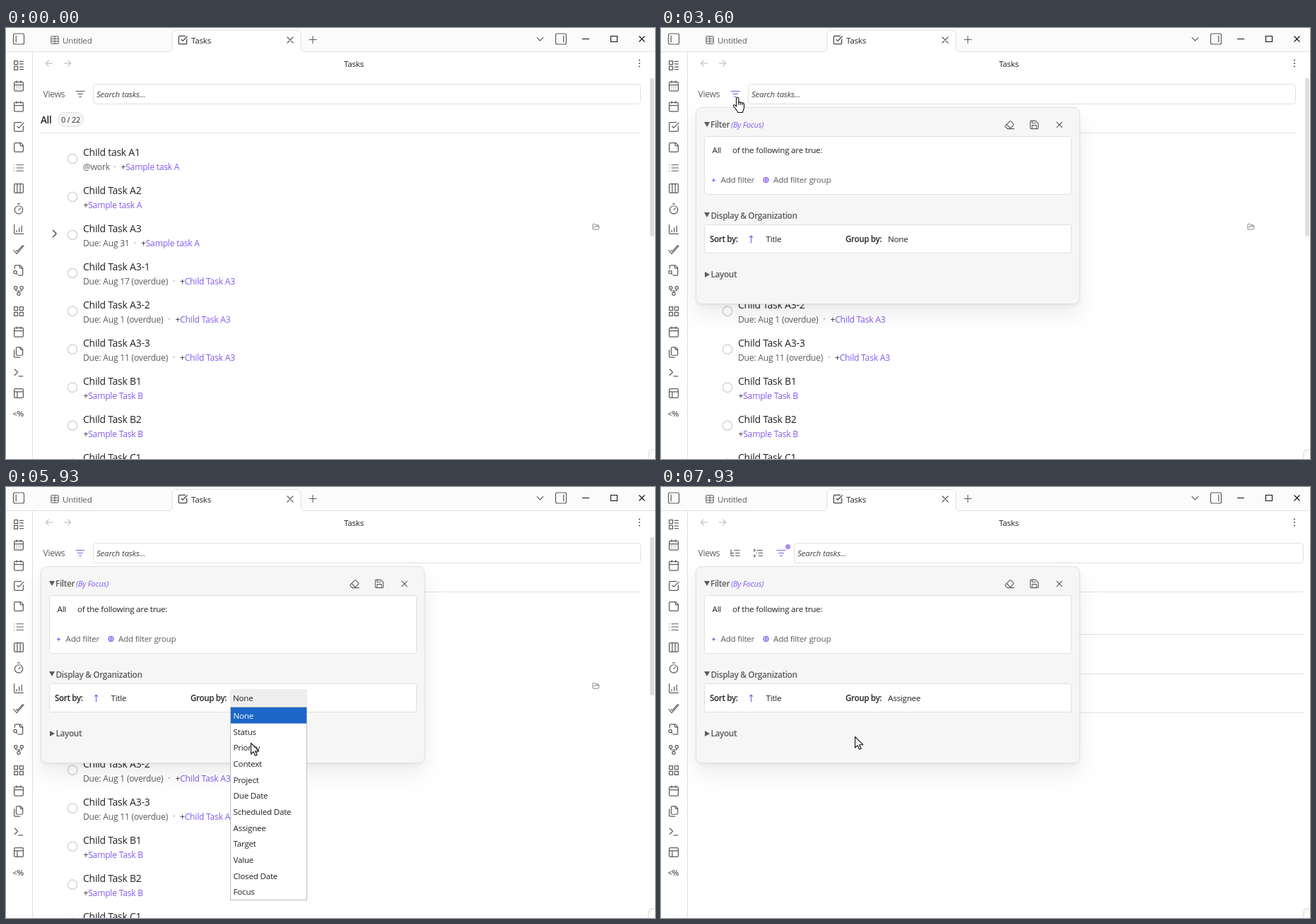
Write an HTML page that moves like this. It is 918 px wide and 610 px high and loops after 8 s.

```html
<!DOCTYPE html>
<html lang="en">
<head>
<meta charset="utf-8">
<title>Tasks</title>
<style>
html, body { margin: 0; width: 100%; height: 100%; overflow: hidden; background: #fff; }
svg { display: block; }
text { font: 11.6px "Open Sans", "Noto Sans", sans-serif; letter-spacing: -.018em; white-space: pre; }
.icon { fill: none; stroke-linecap: round; stroke-linejoin: round; }
.shadow {
  filter: drop-shadow(0 1px 1px rgba(0, 0, 0, .028)) drop-shadow(0 3.4px 3.4px rgba(0, 0, 0, .042))
    drop-shadow(0 15px 15px rgba(0, 0, 0, .07));
}
</style>
</head>
<body>
<svg id="stage" width="918" height="610" viewBox="0 0 918 610"></svg>
<script>
const LOOP = 8000, STEP = 1000 / 15;
const DARK = '#222', GREY = '#5c5c5c', LINE = '#e0e0e0', ACCENT = '#825af0';

// Markup helpers
const text = (x, y, s, { size = 11.6, fill = GREY, bold, italic, id = '' } = {}) =>
  `<text id="${id}" x="${x}" y="${y}" fill="${fill}" style="font-size:${size}px;` +
  `${bold ? 'font-weight:600;letter-spacing:-.03em;' : ''}${italic ? 'font-style:italic' : ''}">${s}</text>`;
const icon = (d, x, y, size = 18, color = GREY, width = 1.75, id = '') =>
  `<path id="${id}" class="icon" d="${d}" stroke="${color}" stroke-width="${width}" ` +
  `transform="translate(${x - size / 2} ${y - size / 2}) scale(${size / 24})"/>`;
const rect = (x, y, w, h, fill, stroke = 'none', r = 0, more = '') =>
  `<rect x="${x}" y="${y}" width="${w}" height="${h}" rx="${r}" fill="${fill}" stroke="${stroke}" ${more}/>`;
const hline = (x1, x2, y) => `<path d="M${x1} ${y}H${x2}" stroke="${LINE}"/>`;
const circle = (x, y, r, fill, stroke = 'none', w = 1) =>
  `<circle cx="${x}" cy="${y}" r="${r}" fill="${fill}" stroke="${stroke}" stroke-width="${w}"/>`;
const group = (id, ...parts) => `<g id="${id}">${parts.join('')}</g>`;
const dots = (x, y, color) => [-4.5, 0, 4.5].map(d => circle(x, y + d, 1.1, color)).join('');
const ring = (x, y, r) => `M${x - r} ${y}a${r} ${r} 0 1 0 ${2 * r} 0a${r} ${r} 0 1 0 ${-2 * r} 0`;

// Icon outlines on a 24 unit grid
const BOX = 'M5 3h14a2 2 0 0 1 2 2v14a2 2 0 0 1-2 2H5a2 2 0 0 1-2-2V5a2 2 0 0 1 2-2z';
const CALENDAR = 'M8 2v4M16 2v4M3 10h18M5 4h14a2 2 0 0 1 2 2v14a2 2 0 0 1-2 2H5a2 2 0 0 1-2-2V6a2 2 0 0 1 2-2z';
const CHECK = 'M21 10.5V19a2 2 0 0 1-2 2H5a2 2 0 0 1-2-2V5a2 2 0 0 1 2-2h12.5M9 11l3 3L22 4';
const CROSS = 'M5 5l14 14M19 5L5 19';
const FILTER = 'M3 6h18M7 12h10M10 18h4';
const PANEL = 'M5 2h14a3 3 0 0 1 3 3v14a3 3 0 0 1-3 3H5a3 3 0 0 1-3-3V5a3 3 0 0 1 3-3z';
const RIBBON = [
  'M3 3h7v7H3zM3 14h7v7H3zM14 4h7M14 9h7M14 15h7M14 20h7',
  CALENDAR + 'M8 14h.01M12 14h.01M16 14h.01M8 18h.01M12 18h.01M16 18h.01',
  CALENDAR,
  CHECK,
  'M16 3H5a2 2 0 0 0-2 2v14a2 2 0 0 0 2 2h14a2 2 0 0 0 2-2V8zM15 3v4a2 2 0 0 0 2 2h4',
  'M3 6h.01M3 12h.01M3 18h.01M8 6h13M8 12h13M8 18h13',
  BOX + 'M9 3v18M15 3v18',
  'M10 2h4M12 14l3-3' + ring(12, 14, 8),
  'M3 3v16a2 2 0 0 0 2 2h16M8 17v-3M13 17V9M18 17V5',
  'M2 13l6 7L22 4M7 13l2 2L20 3',
  'M14 2v4a2 2 0 0 0 2 2h4M4 8V4a2 2 0 0 1 2-2h9l5 5v13a2 2 0 0 1-2 2h-7M9 20l-2-2' + ring(5, 15.5, 3),
  'M18 9v2c0 .6-.4 1-1 1H7c-.6 0-1-.4-1-1V9M12 12v3' + ring(12, 18, 3) + ring(6, 6, 3) + ring(18, 6, 3),
  'M3 3h7v7H3zM14 3h7v7h-7zM14 14h7v7h-7zM3 14h7v7H3z',
  CALENDAR,
  'M20 7h-3a2 2 0 0 1-2-2V2M9 18a2 2 0 0 1-2-2V4a2 2 0 0 1 2-2h7l4 4v10a2 2 0 0 1-2 2zM3 7.6v12.8A1.6 1.6 0 0 0 4.6 22h9.8',
  'M4 17l6-6-6-6M12 19h8',
  BOX + 'M3 9h18M9 21V9'
];

const frame = [
  rect(0, 0, 918, 33, '#fbfbfb'),
  hline(0, 918, 33.5),
  `<path d="M229 33.500q6 0 6-6V9.500a6 6 0 0 1 6-6h170a6 6 0 0 1 6 6v18q0 6 6 6V35H229z" fill="#fff"/>`,
  `<path d="M229 33.500q6 0 6-6V9.500a6 6 0 0 1 6-6h170a6 6 0 0 1 6 6v18q0 6 6 6" fill="none" stroke="${LINE}"/>`,
  `<path d="M37.500 34V610" stroke="${LINE}"/>`,
  icon(PANEL + 'M7 6v12', 18, 15.5, 18, GREY, 1.6),
  icon(BOX + 'M3 9h18M3 15h18M12 3v18', 69, 17, 14),
  text(80, 21.5, 'Untitled'),
  icon(CHECK, 250, 17, 15, '#444', 2),
  text(262, 21.5, 'Tasks', { fill: DARK }),
  icon(CROSS, 402, 17, 14, '#444', 2),
  icon('M12 4v16M4 12h16', 434, 16.5, 15),
  icon('M5 9l7 7 7-7', 755.5, 15.5, 15),
  icon(PANEL + 'M17 6v12', 785, 15.5, 18, GREY, 1.6),
  `<path d="M815 15.500h10M855.500 11.500h9v8h-9zM895.500 11.500l8 8m0-8l-8 8" fill="none" stroke="#111" stroke-width="1.100"/>`,
  ...RIBBON.map((d, i) => icon(d, 18, 53 + 29 * i, 17)),
  text(9.5, 549.5, '&lt;%', { size: 11.3, bold: true }),
  icon('M20 12H4M11 5l-7 7 7 7', 61, 50, 14, '#b5b5b5'),
  icon('M4 12h16M13 5l7 7-7 7', 87, 50, 14, '#b5b5b5'),
  text(478, 54.5, 'Tasks', { fill: DARK }),
  dots(896, 50, GREY),
  text(52.5, 98, 'Views', { size: 12.1 }),
  `<path d="M908.500 610V603q0-6.500 6.500-6.500H918" fill="#f6f6f6" stroke="${LINE}"/>`
].join('');

// Task list: title, note, x of the "+" mark, linked parent
const tasks = [
  ['Child task A1', '@work', 162.5, 'Sample task A'],
  ['Child Task A2', '', 109.5, 'Sample task A'],
  ['Child Task A3', 'Due: Aug 31', 191, 'Sample task A'],
  ['Child Task A3-1', 'Due: Aug 17 (overdue)', 246, 'Child Task A3'],
  ['Child Task A3-2', 'Due: Aug 1 (overdue)', 239.5, 'Child Task A3'],
  ['Child Task A3-3', 'Due: Aug 11 (overdue)', 246, 'Child Task A3'],
  ['Child Task B1', '', 109.5, 'Sample Task B'],
  ['Child Task B2', '', 109.5, 'Sample Task B'],
  ['Child Task C1', '', 109.5, 'Sample Task C']
];
const taskRow = ([title, note, x, parent], i) => {
  const y = 53.95 * i, size = 12.1;
  return circle(94, 185 + y, 6.7, 'none', '#d6d6d6', 1.5) +
    text(109, 181 + y, title, { size: 14, fill: DARK }) +
    (note && text(109, 201.3 + y, note, { size }) + circle(x - 8.5, 196 + y, 1.2, '#c4c4c4')) +
    text(x, 201.3 + y, `+<tspan fill="${ACCENT}">${parent}</tspan>`, { size, fill: '#333' });
};
const search = x => text(x, 98, 'Search tasks...', { fill: '#444', italic: true });

const list = group('list',
  group('rowHover', rect(49, 376, 849, 51, '#f5f1fd'), dots(883.5, 390, '#888')),
  rect(92, 81, 26, 25, '#f7f7f7', 'none', 4, 'id="filterHover"'),
  icon(FILTER, 105, 93.5, 16, GREY, 1.75, 'filterIcon'),
  rect(123.5, 79.5, 774, 28, '#fff', LINE, 4),
  search(128),
  text(49, 135, 'All', { size: 13.5, fill: DARK, bold: true }),
  rect(73.5, 119.5, 36, 20, '#f5f5f5', LINE, 10),
  text(78, 133.5, '0 / 22', { size: 10.8, fill: '#333' }),
  hline(49, 898, 148.5),
  ...tasks.map(taskRow),
  icon('M9 5l7 7-7 7', 68.5, 291, 16, '#444', 2),
  icon('M6 14l1.500-3A2 2 0 0 1 9.200 10H20a2 2 0 0 1 2 2.500L20.500 18.500A2 2 0 0 1 18.500 20H4a2 2 0 0 1-2-2V5a2 2 0 0 1 2-2h4l3 3h7a2 2 0 0 1 2 2v2', 834.5, 281.5, 11, '#777', 2),
  rect(911, 71, 6, 224, '#dedede', 'none', 2));

const TREE = 'M21 6H10M21 12h-8M21 18h-8';
const grouped = group('grouped',
  icon(TREE + 'M3 5v11a2 2 0 0 0 2 2h4M3 10a2 2 0 0 0 2 2h4', 105, 93.5, 16),
  icon(TREE + 'M3 4l3 2-3 2M3 16l3 2-3 2M8 12h1', 137.5, 93.5, 16),
  icon(FILTER, 170, 93.5, 16, ACCENT),
  circle(179.5, 84.5, 3.5, '#a98bf0'),
  rect(188.5, 79.5, 720, 28, '#fff', LINE, 4),
  search(193),
  ...[148.5, 208.5, 264.5, 319.5].map(y => hline(49, 909, y)));

const label = (x, y, s) => text(x, y, s, { size: 11.8, bold: true });
const popup = group('popup',
  rect(49.5, 112.5, 542.5, 278, '#f6f6f6', LINE, 8, 'class="shadow"'),
  `<path d="M61 133h8l-4 7zM61 261h8l-4 7zM62 345l7 4-7 4z" fill="${GREY}"/>`,
  label(70, 141, 'Filter'),
  text(99, 141, '(By Focus)', { size: 11, fill: ACCENT, italic: true }),
  icon('M7 21l-4.300-4.300a2 2 0 0 1 0-2.800l9.600-9.600a2 2 0 0 1 2.800 0l5.600 5.600a2 2 0 0 1 0 2.800L13 21M22 21H7M5 11l9 9', 493, 137, 15),
  icon('M15 3H5a2 2 0 0 0-2 2v14a2 2 0 0 0 2 2h14a2 2 0 0 0 2-2V9zM17 21v-8H7v8M7 3v5h8', 528, 137, 15),
  icon(CROSS, 563.5, 137, 13, GREY, 2),
  rect(61.5, 153.5, 519, 82, '#fff', LINE, 3),
  text(72.5, 177, 'All', { fill: DARK }),
  text(101, 177, 'of the following are true:', { fill: DARK }),
  `<path d="M72 215.500h5m-2.500-2.500v5" stroke="${ACCENT}" stroke-width="1.200"/>`,
  text(84.5, 218.5, 'Add filter'),
  circle(148.5, 215, 3.4, 'none', ACCENT, 1.2),
  `<path d="M145 215h7m-3.500-3.500v7" stroke="${ACCENT}" stroke-width="1.200"/>`,
  text(159, 218.5, 'Add filter group'),
  label(70.5, 269.5, 'Display &amp; Organization'),
  rect(61.5, 278.5, 519, 40, '#fff', LINE, 3),
  text(69, 303, 'Sort by:', { fill: DARK, bold: true }),
  icon('M12 21V3M8 7l4-4 4 4', 127.5, 299, 13, ACCENT, 2),
  text(148.5, 303, 'Title', { fill: DARK }),
  text(261, 303, 'Group by:', { fill: DARK, bold: true }),
  rect(317, 286, 109, 26, '#eee', 'none', 3, 'id="selectHover"'),
  text(321, 303, 'None', { fill: DARK, id: 'choice' }),
  label(70.5, 353, 'Layout'));

const options = ['None', 'Status', 'Priority', 'Context', 'Project', 'Due Date', 'Scheduled Date',
  'Assignee', 'Target', 'Value', 'Closed Date', 'Focus'];
const ROW = 22.66, TOP = 312;
const menu = group('menu',
  rect(317.5, 311.5, 108, 273, '#fff', '#bdbdbd'),
  rect(318, TOP, 107, ROW, '#1c66c9', 'none', 0, 'id="mark"'),
  ...options.map((s, i) => text(321.5, 328 + ROW * i, s, { fill: DARK })));

const shape = (id, d, detail = '') =>
  `<g id="${id}"><path d="${d}" fill="#fff" stroke="#111" stroke-width="1.100" stroke-linejoin="round"/>` +
  `<path d="${detail}" fill="none" stroke="#111"/></g>`;
const cursor = group('cursor',
  shape('arrow', 'M.5 .5v15.500l3.600-3.400 2.500 5.700 2.500-1.100-2.500-5.500h5z'),
  shape('hand', 'M-1.500 13V2a1.700 1.700 0 0 1 3.400 0v5.500a1.500 1.500 0 0 1 2.700.5a1.500 1.500 0 0 1 2.600.6a1.300 1.300 0 0 1 2.300.8v5c0 3-2 4.500-2 7.100H.5c0-2.500-3-4.500-5.500-8.500c-1.500-2.400 1.500-3.500 3.500 0z',
    'M1.900 7v4M4.600 8v3M7.200 9v2.500'),
  shape('grab', 'M-5 9.500C-6 6-9 3-9.500 .5c0-2 2-2 3.500 0l-1.500-5.500c0-2 2.400-2.200 3-.5l.3-2.800c.2-2 2.800-2 3.200 0 .6-1.800 3-1.500 3.200.5l.2 1.300c.8-1.500 3-1 3.100.8 1-1.200 2.600-.6 2.700 1 0 5-2.200 8-2.200 14.200z',
    'M-4.500-5l1.200 4M-1-8v6.500M2.300-6.500l-.2 5M5.500-5l-.5 4'));

const stage = document.getElementById('stage');
stage.innerHTML = frame + list + grouped + popup + menu + cursor;
const el = id => document.getElementById(id);
const show = (id, on) => el(id).setAttribute('display', on ? 'inline' : 'none');

// Pointer path: time, x, y
const path = [
  [0, 9, 15], [730, 139, 41], [800, 139, 41], [870, 146, 47], [1330, 146, 47], [1400, 144, 48],
  [1530, 143, 49], [1800, 143, 49], [2200, 122, 76], [2530, 108, 97], [2670, 107, 97], [3530, 107, 97],
  [3600, 108, 98], [3800, 108, 98], [4000, 260, 260], [4200, 410, 400], [4400, 414, 388], [4670, 344, 304],
  [4800, 344, 304], [4870, 341, 300], [5600, 341, 300], [5800, 343, 326], [5930, 346, 361],
  [6470, 361, 452], [6700, 367, 479], [6870, 368, 483], [7460, 368, 483], [7700, 310, 400],
  [7930, 274, 353], [LOOP, 274, 353]
];
function pointer(t) {
  const i = Math.max(1, path.findIndex(p => p[0] >= t));
  const [t0, x0, y0] = path[i - 1], [t1, x1, y1] = path[i];
  const k = (t - t0) / (t1 - t0);
  return [x0 + (x1 - x0) * k, y0 + (y1 - y0) * k];
}

function draw(now) {
  const t = Math.floor((now % LOOP + 4) / STEP) * STEP % LOOP + 2;
  const within = (a, b) => t >= a - 3 && t < b - 3;
  const done = within(7070, LOOP);

  show('list', within(0, 7130));
  show('grouped', within(7130, LOOP));
  show('popup', within(3270, LOOP));
  show('rowHover', within(4130, 4530));
  show('filterHover', within(2530, 3270));
  el('filterIcon').setAttribute('stroke', within(3070, LOOP) ? ACCENT : within(2530, 3070) ? '#111' : GREY);
  show('selectHover', within(4730, 7070));
  el('choice').textContent = done ? 'Assignee' : 'None';

  // The highlighted option trails the pointer slightly
  show('menu', within(5070, 7070));
  const row = Math.max(0, Math.floor((pointer(Math.max(0, t - 135))[1] - TOP) / ROW));
  el('mark').setAttribute('y', TOP + ROW * row);
  document.querySelectorAll('#menu text').forEach((o, i) => o.setAttribute('fill', i === row ? '#fff' : DARK));

  const [x, y] = pointer(t).map(Math.round);
  const kind = within(2530, 3870) ? 'hand' : within(4130, 4530) ? 'grab' : 'arrow';
  show('cursor', within(70, LOOP));
  ['arrow', 'hand', 'grab'].forEach(id => show(id, id === kind));
  el('cursor').setAttribute('transform', `translate(${x} ${y})`);
}

const start = performance.now();
function tick() {
  draw(performance.now() - start);
  requestAnimationFrame(tick);
}
tick();
</script>
</body>
</html>
```
